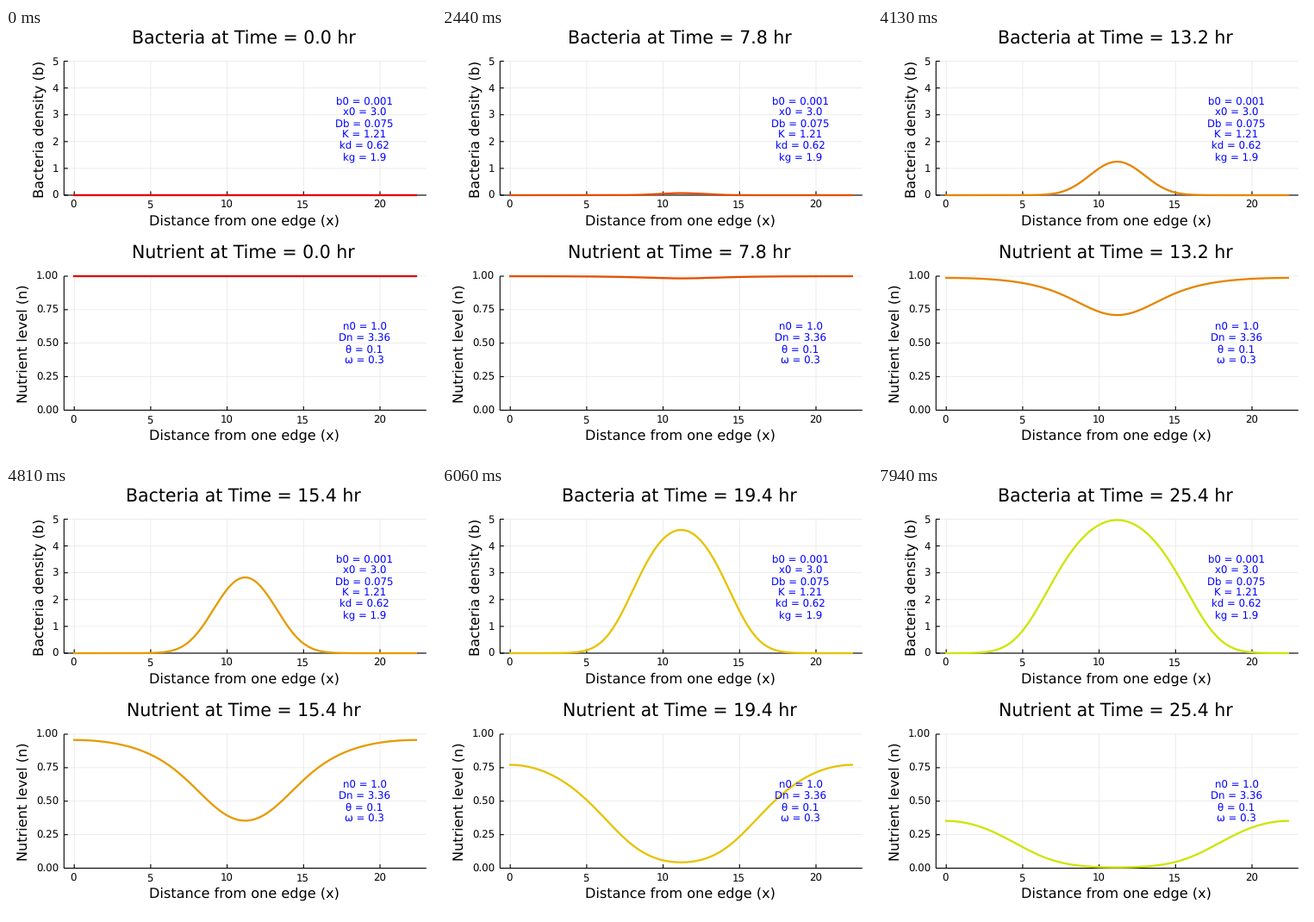
Write a matplotlib script that moves like this. It is 499 by 499 pixels and loops after 8000 ms.

```python
import colorsys

import matplotlib.pyplot as plt
import numpy as np
from matplotlib.animation import FuncAnimation
from matplotlib.collections import LineCollection

SIZE = 499
DPI = 100
PX = 72 / DPI              # points per pixel
STEPS = 128                # distinct pictures in one loop
TICKS, TICK_MS = 400, 20   # timer ticks in one loop
HOURS = 0.2                # simulated hours per step

# Effective model rates
LENGTH = 22.36
B0, X0, DB, K = 0.001, 3.0, 0.075, 1.21
N0, DN = 1.0, 3.36
GROWTH, UPTAKE = 1.282, 0.557

# Layout in pixels, measured from the top left corner
LEFT, RIGHT = 67.3, 487.8
ORIGIN, UNIT = 79.2, 17.74
TOP, HEIGHT, SHIFT = 38.5, 155.5, 249.5
TITLE, GUIDE, SMALL = 20.55, 16.15, 11.75

plt.rcParams["font.family"] = "DejaVu Sans"
plt.rcParams["text.hinting"] = "none"


def laplacian(u, dx):
    padded = np.concatenate(([u[1]], u, [u[-2]]))
    return (padded[2:] - 2 * u + padded[:-2]) / dx ** 2


def simulate(points=201, substeps=125):
    """Bacteria feeding on a diffusing nutrient, no flux at either edge."""
    x = np.linspace(0, LENGTH, points)
    dx, dt = x[1], HOURS / substeps
    b = np.where(np.abs(x - LENGTH / 2) <= X0 / 2, B0, 0.0)
    n = np.full(points, N0)
    states = [(b, n)]
    for _ in range(STEPS - 1):
        for _ in range(substeps):
            feeding = n / (K + n) * b
            b, n = (b + dt * (DB * laplacian(b, dx) + GROWTH * feeding),
                    n + dt * (DN * laplacian(n, dx) - UPTAKE * feeding))
        states.append((b, n))
    return x, states


def label(x, y, text, size, ha="center", **style):
    """Text with its baseline at pixel (x, y)."""
    return fig.text(x / SIZE, 1 - y / SIZE, text, fontsize=size * PX, ha=ha,
                    va="baseline", rotation_mode="anchor", **style)


def strokes(ax, segments, color, width, zorder):
    ax.add_collection(LineCollection(
        segments, colors=color, linewidths=width * PX, zorder=zorder,
        clip_on=False, snap=False), autolim=False)


def panel(top, ymax, yticks, fmt, name, name_x, notes):
    bottom = top + HEIGHT
    xticks = range(0, 25, 5)
    x0, x1 = (LEFT - ORIGIN) / UNIT, (RIGHT - ORIGIN) / UNIT
    ax = fig.add_axes([LEFT / SIZE, 1 - bottom / SIZE,
                       (RIGHT - LEFT) / SIZE, HEIGHT / SIZE])
    ax.set(xlim=(x0, x1), ylim=(0, ymax))
    ax.axis("off")

    grid = [[(v, 0), (v, ymax)] for v in xticks]
    grid += [[(x0, v), (x1, v)] for v in yticks]
    strokes(ax, grid, "0.9", 0.73, 1)

    dx, dy = 4.5 / UNIT, 4.5 / HEIGHT * ymax
    frame = [[(x0, 0), (x1, 0)], [(x0, 0), (x0, ymax)]]
    frame += [[(v, 0), (v, dy)] for v in xticks]
    frame += [[(x0, v), (x0 + dx, v)] for v in yticks]
    strokes(ax, frame, "black", 1.1, 2)

    for v in xticks:
        label(ORIGIN + v * UNIT - 0.8, bottom + 15.2, str(v), SMALL)
    for v in yticks:
        y = bottom - v / ymax * HEIGHT
        label(61, y + 4.2, format(v, fmt), SMALL, ha="right")
    label(276, bottom + 34.6, "Distance from one edge (x)", GUIDE)
    label(name_x, top + HEIGHT / 2 + 0.8, name, GUIDE, rotation=90)

    middle = top + HEIGHT / 2 + 4.6
    for i, note in enumerate(notes):
        y = middle + (i - (len(notes) - 1) / 2) * 12.93
        label(416, y, note, SMALL, color="blue")

    title = label(275.8, top - 19.8, "", TITLE)
    line, = ax.plot([], [], linewidth=2.3 * PX, clip_on=False, zorder=3)
    return title, line


fig = plt.figure(figsize=(SIZE / DPI, SIZE / DPI), dpi=DPI, facecolor="white")
xs, states = simulate()

b_title, b_line = panel(
    TOP, 5, range(6), "d", "Bacteria density (b)", 44,
    ["b0 = 0.001", "x0 = 3.0", "Db = 0.075", "K = 1.21", "kd = 0.62",
     "kg = 1.9"])
n_title, n_line = panel(
    TOP + SHIFT, 1, [0, 0.25, 0.5, 0.75, 1], ".2f", "Nutrient level (n)", 25,
    ["n0 = 1.0", "Dn = 3.36", "θ = 0.1", "ω = 0.3"])


def update(tick):
    step = (8 * tick + 5) // 25      # one step per 62.5 ms
    color = colorsys.hsv_to_rgb(step * 0.525 / 360, 1, 0.9)
    for line, values in zip((b_line, n_line), states[step]):
        line.set_data(xs, values)
        line.set_color(color)
    b_title.set_text(f"Bacteria at Time = {step * HOURS:.1f} hr")
    n_title.set_text(f"Nutrient at Time = {step * HOURS:.1f} hr")
    return b_line, n_line, b_title, n_title


anim = FuncAnimation(fig, update, frames=TICKS, interval=TICK_MS,
                     repeat=True, repeat_delay=0)
plt.show()
```
